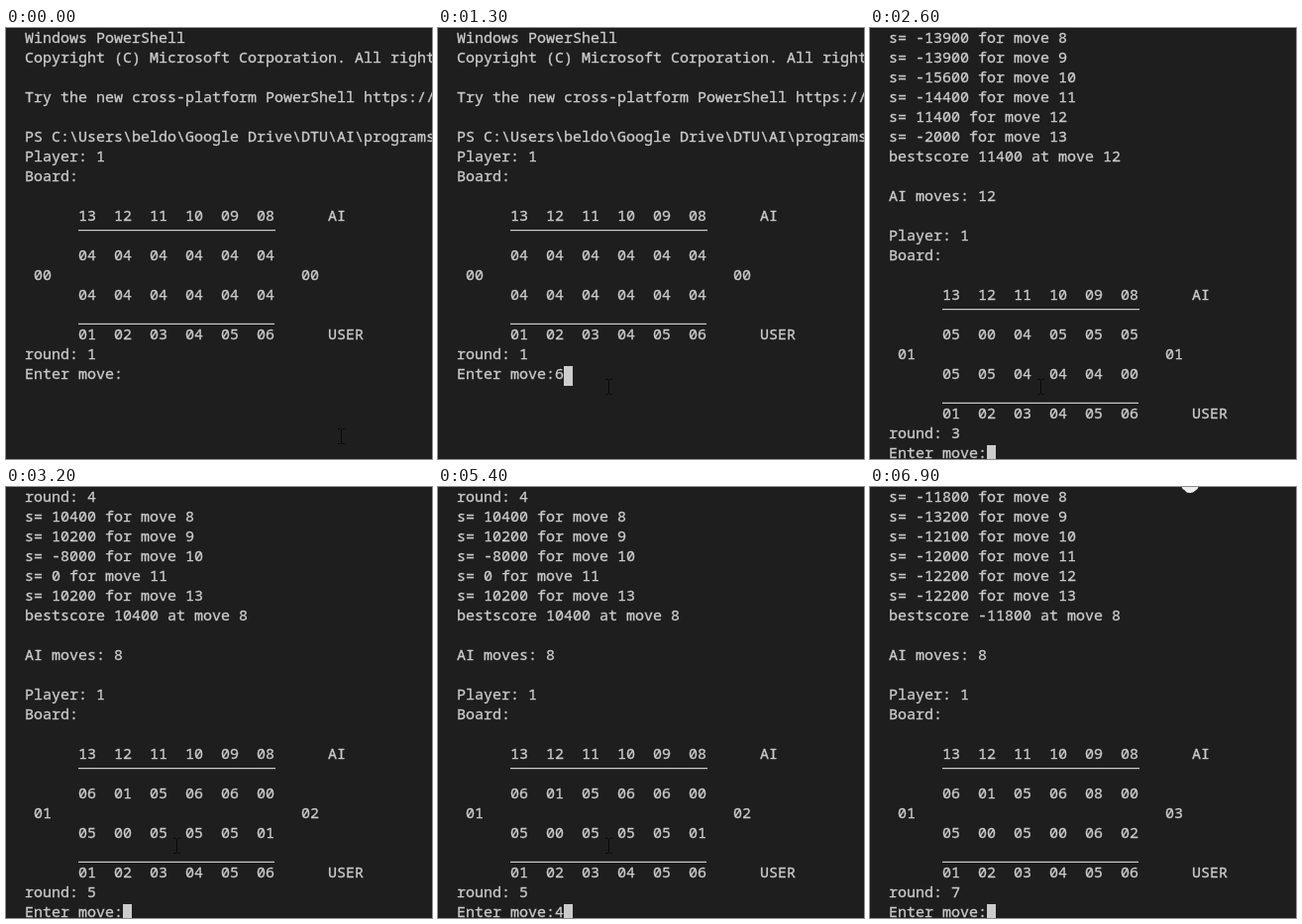
Recreate the animation shown at these times as an HTML page. Size 430 by 436 pixels, loop 7 s.

```html
<!DOCTYPE html>
<html lang="en">
<head>
<meta charset="utf-8">
<title>Board game in a terminal</title>
<style>
html, body { margin: 0; width: 100%; height: 100%; overflow: hidden; background: #1e1e1e; }
svg { display: block; }
text { font: 15px "Noto Sans Mono", "DejaVu Sans Mono", monospace; fill: #ccc; stroke: #ccc; stroke-width: .3px; white-space: pre; }
</style>
</head>
<body>
<svg id="stage" width="430" height="436" viewBox="0 0 430 436">
  <rect width="430" height="436" fill="#1e1e1e"/>
  <g id="screen"></g>
  <rect id="block" width="9" height="20" fill="#ccc"/>
  <path id="beam" d="M-3.5 -7.5H-1L0 -6.5L1 -7.5H3.5M0 -6.5V6.5M-3.5 7.5H-1L0 6.5L1 7.5H3.5" fill="none" stroke="#080808"/>
  <path id="hand" d="M314.5 0H331.5Q331 2.5 328 4Q326 6 323 6Q319 6 318 3.5Q315.5 3 314.5 0Z" fill="#eee"/>
</svg>
<script>
const LOOP = 7000, STEP = 100, LEFT = 19, CHAR = 9, ROW = 20, BASE = 15;
const $ = id => document.getElementById(id);

const scores = list => list.map(([s, m]) => `s= ${s} for move ${m}`);
const aiTurn = (score, move) => [`bestscore ${score} at move ${move}`, "", `AI moves: ${move}`, ""];

const screens = [
  {
    start: 0, focus: 800, typed: 1200, move: "6", round: 1,
    head: [
      "Windows PowerShell",
      "Copyright (C) Microsoft Corporation. All rights reserved.",
      "",
      "Try the new cross-platform PowerShell https://aka.ms/pscore6",
      "",
      "PS C:\\Users\\beldo\\Google Drive\\DTU\\AI\\programs"
    ],
    ai: [4, 4, 4, 4, 4, 4], user: [4, 4, 4, 4, 4, 4], store: [0, 0]
  },
  {
    start: 1400, focus: 1400, typed: 2700, move: "2", round: 3,
    head: [
      ...scores([[-13900, 8], [-13900, 9], [-15600, 10], [-14400, 11], [11400, 12], [-2000, 13]]),
      ...aiTurn(11400, 12)
    ],
    ai: [5, 0, 4, 5, 5, 5], user: [5, 5, 4, 4, 4, 0], store: [1, 1]
  },
  {
    start: 3100, focus: 3100, typed: 5400, move: "4", round: 5,
    head: [
      "round: 4",
      ...scores([[10400, 8], [10200, 9], [-8000, 10], [0, 11], [10200, 13]]),
      ...aiTurn(10400, 8)
    ],
    ai: [6, 1, 5, 6, 6, 0], user: [5, 0, 5, 5, 5, 1], store: [1, 2]
  },
  {
    start: 5500, focus: 5500, typed: LOOP, move: "", round: 7,
    head: [
      ...scores([[-11800, 8], [-13200, 9], [-12100, 10], [-12000, 11], [-12200, 12], [-12200, 13]]),
      ...aiTurn(-11800, 8)
    ],
    ai: [6, 1, 5, 6, 8, 0], user: [5, 0, 5, 0, 6, 2], store: [1, 3]
  }
];

const two = n => String(n).padStart(2, "0");
const pits = list => " ".repeat(6) + list.map(two).join("  ");

function lines(s) {
  return [
    ...s.head, "Player: 1", "Board:", "",
    pits([13, 12, 11, 10, 9, 8]) + "      AI", "",
    pits(s.ai),
    " " + two(s.store[0]) + " ".repeat(28) + two(s.store[1]),
    pits(s.user), "",
    pits([1, 2, 3, 4, 5, 6]) + "      USER",
    "round: " + s.round,
    "Enter move:"
  ];
}

function markup(s, typed) {
  const rows = lines(s);
  rows[rows.length - 1] += typed;
  const rule = (y, w) => `<rect x="73" y="${y}" width="${w}" height="1.2" fill="#ccc"/>`;
  const top = s.head.length * ROW;
  return rows.map((row, i) => row && `<text x="${LEFT}" y="${BASE + i * ROW}">${row}</text>`).join("")
    + rule(top + 84, 199) + rule(top + 178.8, 198);
}

const clamp = x => Math.min(1, Math.max(0, x));
const ease = x => x * x * (3 - 2 * x);
const mix = (a, b, k) => a + (b - a) * k;

function pointer(t) {
  if (t < 6400) {
    const k = ease(clamp(t / 800));
    return [mix(338.5, 172.5, k), mix(413, 363, k)];
  }
  const k = ease(clamp((t - 6400) / 500));
  return [mix(172.5, 322.5, k), mix(363, -4, k)];
}

let shown = "";
function draw(time) {
  const t = Math.floor((time % LOOP) / STEP) * STEP;
  const s = screens.filter(x => x.start <= t).pop();
  const typed = t >= s.typed ? s.move : "";
  const key = s.round + ":" + typed;
  if (key !== shown) {
    $("screen").innerHTML = markup(s, typed);
    shown = key;
  }

  const last = s.head.length + 11;
  $("block").setAttribute("x", LEFT + (11 + typed.length) * CHAR);
  $("block").setAttribute("y", last * ROW + 2);
  $("block").setAttribute("visibility", t >= s.focus ? "visible" : "hidden");

  const leaving = t >= 6900;
  $("beam").setAttribute("transform", `translate(${pointer(t)})`);
  $("beam").setAttribute("visibility", leaving ? "hidden" : "visible");
  $("hand").setAttribute("visibility", leaving ? "visible" : "hidden");
}

const begin = performance.now();
function tick() {
  draw(performance.now() - begin);
  requestAnimationFrame(tick);
}
tick();
</script>
</body>
</html>
```
